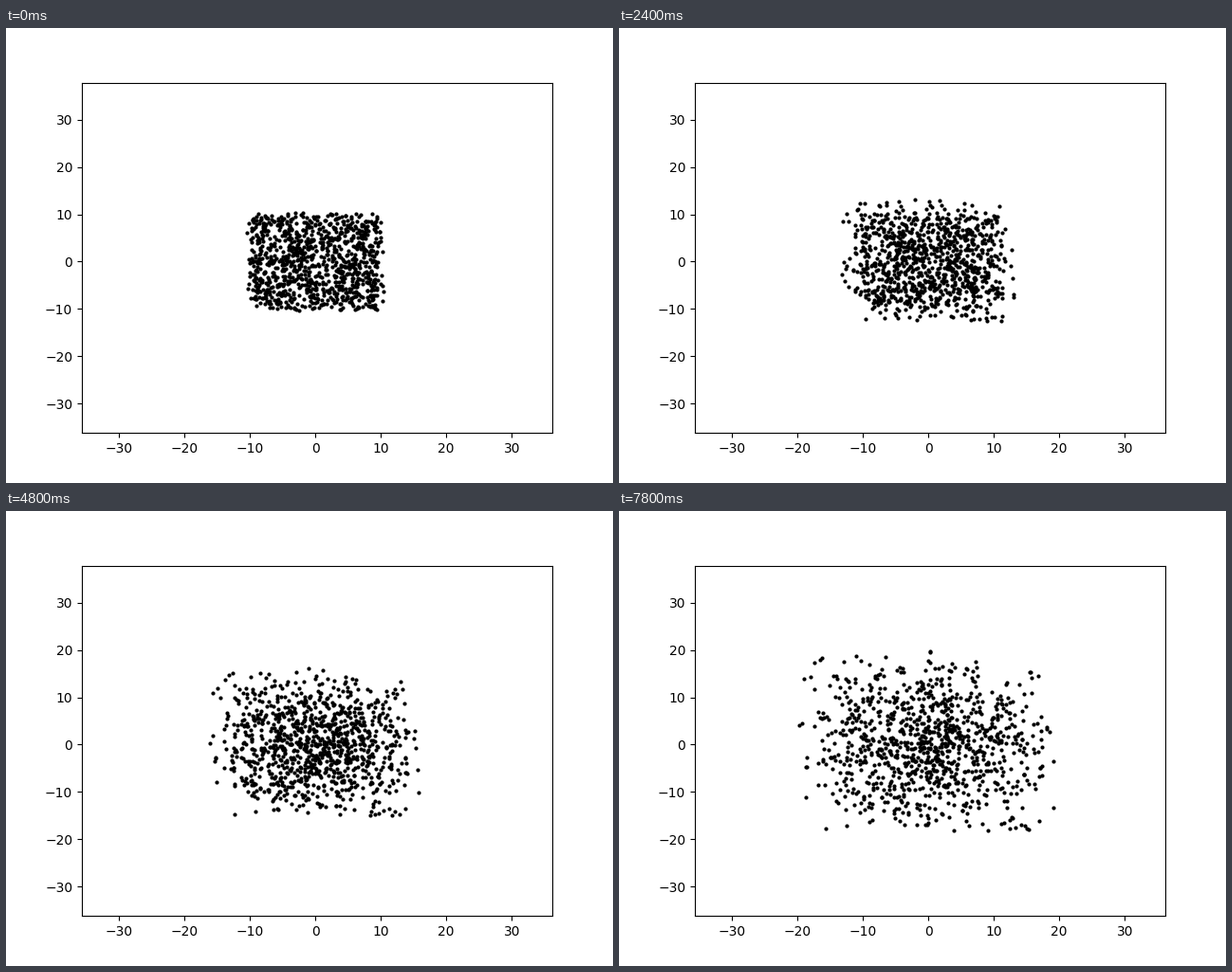
Write a matplotlib script that moves like this. It is 640x480 px and loops after 8000 ms.

```python
import numpy as np
import matplotlib.pyplot as plt
from matplotlib.animation import FuncAnimation

COUNT = 1000
FRAMES = 40
HALF = 10.0     # half side of the starting square
V_MAX = 0.25    # largest step per frame along each axis
LEAD = 2        # steps already taken in the first frame

rng = np.random.default_rng(7)
start = rng.uniform(-HALF, HALF, (COUNT, 2))
velocity = rng.uniform(-V_MAX, V_MAX, (COUNT, 2))

fig, ax = plt.subplots(figsize=(6.4, 4.8), dpi=100)
ax.set_xlim(-35.635, 36.2)
ax.set_ylim(-36.2, 37.835)
dots, = ax.plot([], [], "ko", markersize=2)


def update(step):
    x, y = (start + velocity * (step + LEAD)).T
    dots.set_data(x, y)
    return dots,


anim = FuncAnimation(fig, update, frames=FRAMES, interval=200,
                     repeat=True, repeat_delay=0)
plt.show()
```
